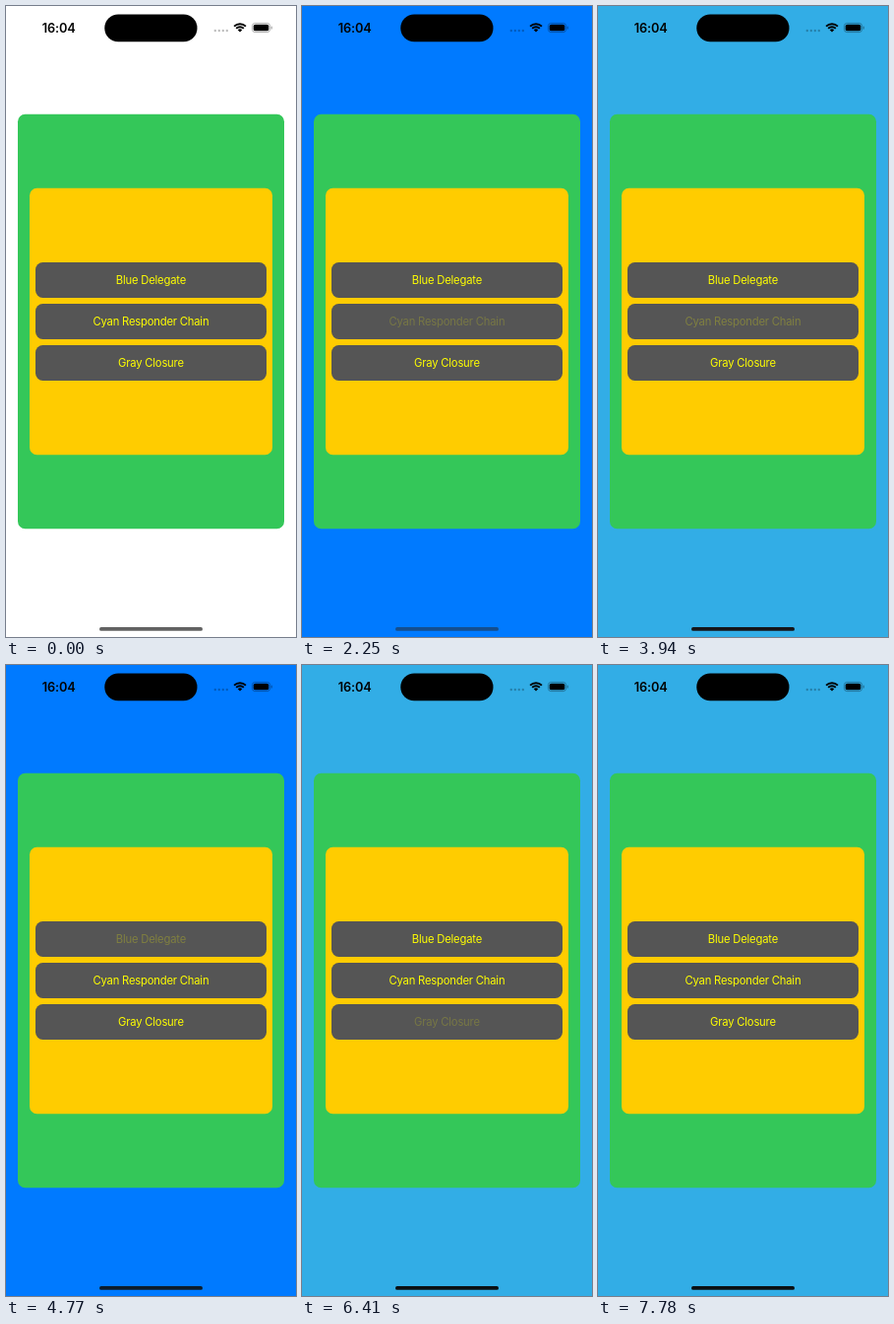
An HTML page with a canvas that plays this animation: 295x640 px, repeating every 8 s.

```html
<!DOCTYPE html>
<html lang="en">
<head>
<meta charset="utf-8">
<title>Background colour buttons</title>
<style>
  html, body { margin: 0; width: 100%; height: 100%; overflow: hidden; background: #fff; }
  canvas { display: block; width: 295px; height: 640px; }
</style>
</head>
<body>
<canvas id="stage"></canvas>
<script>
const W = 295, H = 640, LOOP = 8000;
const canvas = document.getElementById('stage');
const ratio = window.devicePixelRatio || 1;
canvas.width = W * ratio;
canvas.height = H * ratio;
const ctx = canvas.getContext('2d');

const labels = ['Blue Delegate', 'Cyan Responder Chain', 'Gray Closure'];
const fills = ['#007aff', '#32ade6', '#8e8e93'];
// Home indicator colour that settles on each background
const bars = [[20, 78, 143], [10, 15, 18], [24, 23, 26]];
const whiteBar = [98, 98, 98];

// [start, length, button]
const taps = [
  [1310, 530, 0], [2250, 550, 1], [3060, 560, 2], [3830, 520, 1],
  [4670, 530, 0], [5590, 540, 1], [6410, 540, 2], [7250, 530, 1]
];
const STEPS = 5;
const fade = [0.2, 0.25, 0.42, 0.68, 0.9, 1];

function stateAt(t) {
  const s = { bg: '#fff', bar: whiteBar, button: -1, alpha: 1 };
  for (const [start, length, button] of taps) {
    if (t < start) break;
    const step = Math.min(STEPS, Math.floor((t - start) * STEPS / length + 0.1));
    s.button = button;
    s.alpha = fade[step];
    if (step > 0) s.bg = fills[button];
    s.bar = s.bar.map((c, i) => c + (bars[button][i] - c) * step / STEPS);
  }
  return s;
}

function box(x, y, w, h, r, color) {
  ctx.fillStyle = color;
  ctx.beginPath();
  ctx.roundRect(x, y, w, h, r);
  ctx.fill();
}

function text(str, x, y, font, spacing, color) {
  ctx.font = font + ' Inter, sans-serif';
  ctx.letterSpacing = spacing + 'px';
  ctx.textAlign = 'center';
  ctx.textBaseline = 'alphabetic';
  ctx.fillStyle = color;
  ctx.fillText(str, x, y);
}

function wifi(x, y) {
  const a = Math.PI * 0.25;
  ctx.strokeStyle = '#000';
  ctx.lineWidth = 1.9;
  for (const r of [8.4, 5.4]) {
    ctx.beginPath();
    ctx.arc(x, y, r, -Math.PI / 2 - a, -Math.PI / 2 + a);
    ctx.stroke();
  }
  ctx.fillStyle = '#000';
  ctx.beginPath();
  ctx.moveTo(x, y);
  ctx.arc(x, y, 3.2, -Math.PI / 2 - a, -Math.PI / 2 + a);
  ctx.fill();
}

function battery() {
  ctx.strokeStyle = 'rgba(0,0,0,0.38)';
  ctx.lineWidth = 0.8;
  ctx.beginPath();
  ctx.roundRect(250.4, 17.4, 18.2, 9.2, 3);
  ctx.stroke();
  box(269.7, 20.4, 1, 3.2, 0.5, 'rgba(0,0,0,0.4)');
  box(251.7, 18.7, 15.6, 6.6, 1.9, '#000');
}

function statusBar() {
  text('16:04', 53.7, 26.7, '600 12.75px', -0.1, '#000');
  box(100.3, 8.5, 94.2, 27.8, 13.9, '#000');
  for (let i = 0; i < 4; i++) box(211.6 + i * 4, 23.8, 2.4, 2.4, 1.2, 'rgba(0,0,0,0.25)');
  wifi(238, 26.6);
  battery();
}

function draw(t) {
  const s = stateAt(t);
  ctx.setTransform(ratio, 0, 0, ratio, 0, 0);
  ctx.fillStyle = s.bg;
  ctx.fillRect(0, 0, W, H);
  box(12, 109.7, 271, 420.6, 7.5, '#34c759');
  box(24, 184.7, 247, 270.6, 7.5, '#ffcc00');
  labels.forEach((label, i) => {
    const y = 260 + i * 42;
    box(30, y, 235, 36, 7.5, '#555');
    ctx.globalAlpha = i === s.button ? s.alpha : 1;
    text(label, 147.4, y + 22.2, '400 11.25px', -0.2, '#ff0');
    ctx.globalAlpha = 1;
  });
  statusBar();
  box(95, 630, 105, 3.8, 1.9, `rgb(${s.bar.map(Math.round).join(',')})`);
}

const begin = performance.now();
function tick() {
  draw((performance.now() - begin) % LOOP);
  requestAnimationFrame(tick);
}
tick();
</script>
</body>
</html>
```
